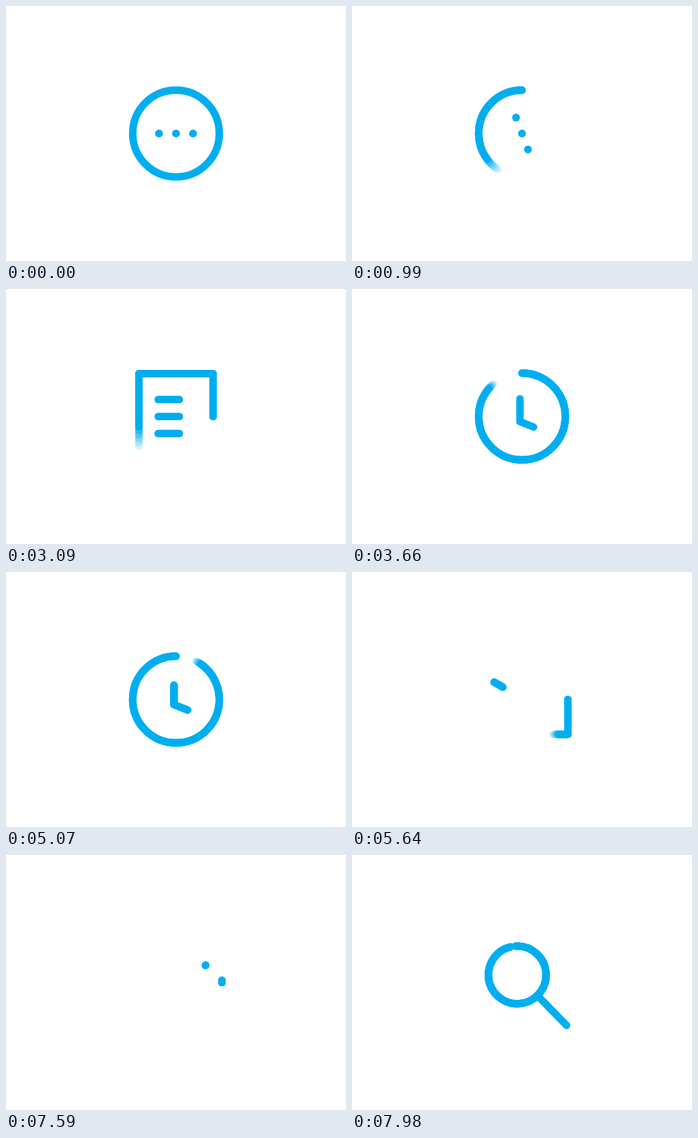
Write an HTML page that moves like this. It is 500x375 px and loops after 8 s.

```html
<!DOCTYPE html>
<html lang="en">
<head>
<meta charset="utf-8">
<title>Icon morph</title>
<style>
html, body { margin: 0; width: 100%; height: 100%; overflow: hidden; background: #fff; }
svg { display: block; width: 100%; height: 100%; }
path { fill: none; stroke-width: 11; stroke-linecap: round; stroke-linejoin: round; }
</style>
</head>
<body>
<svg id="stage" viewBox="0 0 500 375"></svg>
<script>
const LOOP = 8000, STEP = 30, SHUTTER = 10, LAYERS = 6;
const BLUE = [0, 174, 240];
const NEVER = 1e6;
const stage = document.getElementById('stage');

const clamp = x => Math.min(1, Math.max(0, x));
const ease = x => {
  x = clamp(x);
  return x < 0.5 ? 4 * x ** 3 : 1 - 4 * (1 - x) ** 3;
};
const span = (t, from, length) => ease((t - from) / length);

// Opaque mix of the line colour with the white page
const tint = k => `rgb(${BLUE.map(c => Math.round(255 + (c - 255) * k)).join(',')})`;

function addPath(attrs) {
  const el = document.createElementNS('http://www.w3.org/2000/svg', 'path');
  for (const key in attrs) el.setAttribute(key, attrs[key]);
  stage.appendChild(el);
  return el;
}

// Clockwise circle that starts at the given angle from the top
function ring(cx, cy, r, deg = 0) {
  const a = deg * Math.PI / 180;
  const dx = r * Math.sin(a), dy = -r * Math.cos(a);
  return `M${cx + dx} ${cy + dy}A${r} ${r} 0 0 1 ${cx - dx} ${cy - dy}` +
         `A${r} ${r} 0 0 1 ${cx + dx} ${cy + dy}Z`;
}

// Clockwise box that starts in the middle of its right side
const box = (x1, y1, x2, y2) =>
  `M${x2} 187.5V${y2}H${x1}V${y1}H${x2}Z`;

// A line that is drawn in and later wiped out along its length
function stroke(d, inAt, inTime, outAt, outTime = 450, shift = 0) {
  const layers = Array.from({ length: LAYERS }, (_, i) =>
    addPath({ d, pathLength: 1, stroke: tint((i + 1) / LAYERS) }));

  const trim = t => [span(t, outAt, outTime), span(t, inAt, inTime)];

  return t => {
    const wiping = t + SHUTTER > outAt;
    const at = i => {
      const k = i / (LAYERS - 1);
      return trim(t + SHUTTER * (wiping ? k : 1 - k));
    };
    const [lastA, lastB] = at(LAYERS - 1);
    layers.forEach((el, i) => {
      const [a, b] = at(i);
      const same = i < LAYERS - 1 && a === lastA && b === lastB;
      const shown = !same && b - a > 0.0005;
      el.style.display = shown ? '' : 'none';
      if (!shown) return;
      el.setAttribute('stroke-dasharray', `${b - a} 3`);
      el.setAttribute('stroke-dashoffset', -a);
      if (shift) el.setAttribute('transform', `translate(${shift * (1 - b)} 0)`);
    });
  };
}

// Three dots turn upright, then stretch into lines of text
function dots() {
  const rows = [-25, 0, 25].map(y => ({ y, el: addPath({ stroke: tint(1) }) }));
  return t => {
    const angle = span(t, 750, 390) * Math.PI / 2;
    const grow = span(t, 1200, 705);
    const wipe = span(t, 2880, 450);
    const half = 26.2 * grow;
    for (const { y, el } of rows) {
      const x = 250 + y * Math.cos(angle);
      const cy = 187.5 + y * Math.sin(angle);
      el.style.display = wipe < 1 ? '' : 'none';
      el.style.strokeWidth = 11.5 - 0.5 * grow;
      el.setAttribute('d', `M${x - half} ${cy}h${Math.max(0.01, 2 * half * (1 - wipe))}`);
    }
  };
}

const dial = ring(250, 187.5, 63.7);
const parts = [
  stroke(dial, -900, 450, 750),
  dots(),
  stroke(box(195.5, 124.5, 304.5, 250.5), 1200, 705, 2880),
  stroke(dial, 3330, 490, 4950),
  stroke('M247 161.5V195L267 203', 3330, 330, 4950),
  stroke(box(182.5, 136.2, 317.5, 238.7), 5410, 710, 7200),
  stroke('M204.8 162L249.3 187.5L293.8 162', 5410, 710, 7200, 450, 5),
  stroke(ring(243, 176.3, 42.4, -3), 7650, 415, NEVER),
  stroke('M273.5 207.5L315.5 250.5', 7650, 320, NEVER)
];

function draw(t) {
  t = Math.floor(t / STEP) * STEP;
  parts.forEach(part => part(t));
}

const start = performance.now();
function tick() {
  draw((performance.now() - start) % LOOP);
  requestAnimationFrame(tick);
}
tick();
</script>
</body>
</html>
```
